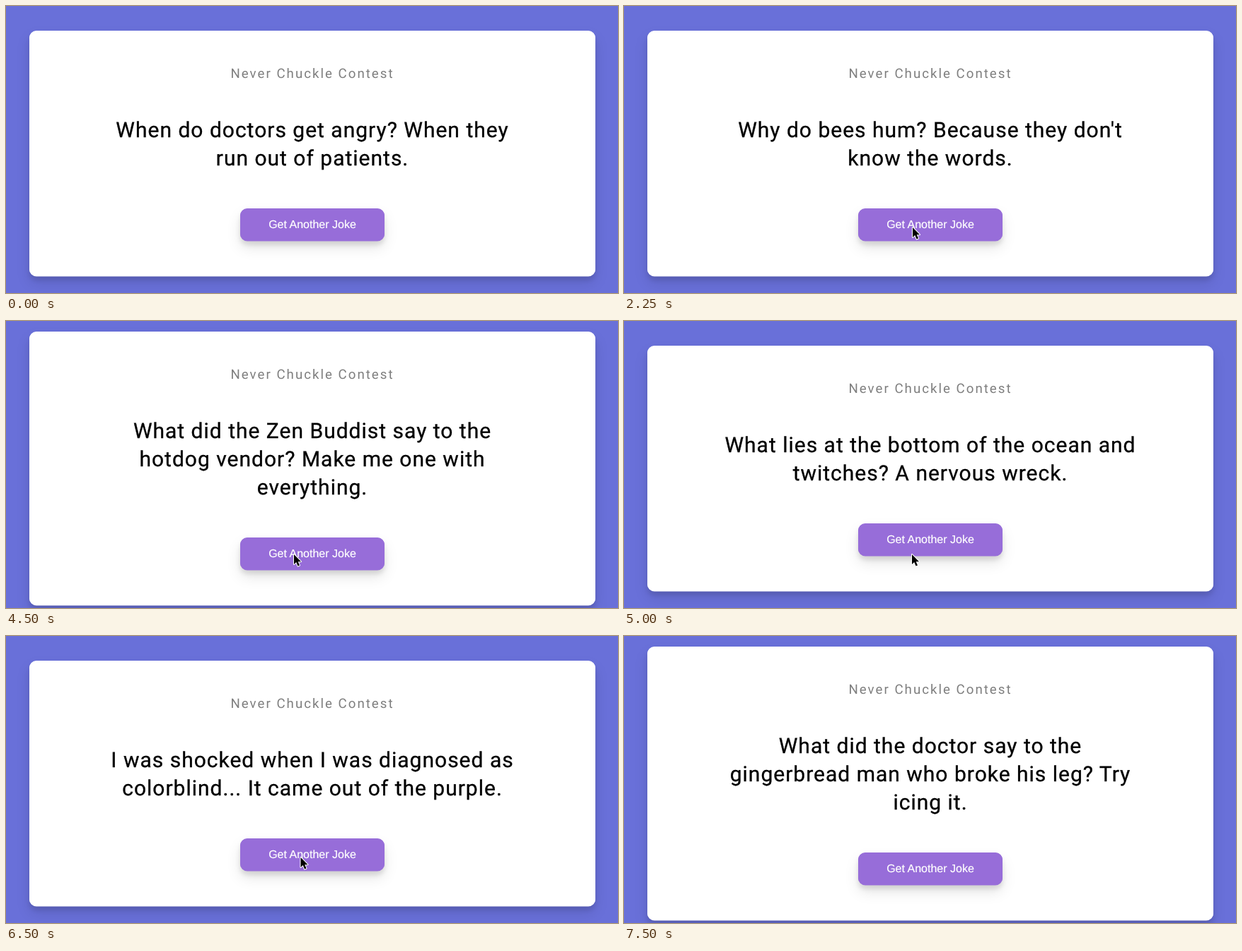
Animation of 865x407 px, one loop 8 s. Source, as an HTML page:

```html
<!DOCTYPE html>
<html lang="en">
<head>
<meta charset="utf-8">
<title>Joke card</title>
<style>
* { box-sizing: border-box; }
html, body { margin: 0; width: 100%; height: 100%; overflow: hidden; background: #6970d9; }
#stage {
  --shadow: 0 10px 20px rgba(0,0,0,.1), 0 6px 6px rgba(0,0,0,.1);
  position: relative; width: 865px; height: 407px; overflow: hidden;
  font-family: Roboto, sans-serif; text-rendering: geometricPrecision;
}
/* The solid half-pixel shadows soften the bottom edges. */
#card {
  position: absolute; left: 33px; width: 800px; padding: 50px 20px;
  background: #fff; border-radius: 10px; text-align: center;
  box-shadow: 0 .5px #fff, var(--shadow);
}
h3 { margin: 0; font-size: 18.72px; font-weight: 400; line-height: 22px; letter-spacing: 2px; opacity: .5; }
#joke {
  margin: 50px 0; font-size: 30px; line-height: 40px; letter-spacing: 1px;
  white-space: pre; color: #000; -webkit-text-stroke: .3px #000;
}
#button {
  width: 204px; height: 46px; margin: 0 auto; border-radius: 10px;
  background: #976dd9; color: #fff; font: 16px/47px "Liberation Sans", Arial, sans-serif;
  -webkit-text-stroke: .2px #fff;
  box-shadow: 0 .5px #976dd9, var(--shadow);
}
#cursor { position: absolute; left: 0; top: .5px; overflow: visible; }
</style>
</head>
<body>
<div id="stage">
  <div id="card">
    <h3>Never Chuckle Contest</h3>
    <div id="joke"></div>
    <div id="button">Get Another Joke</div>
  </div>
  <svg id="cursor" width="12" height="18">
    <path d="M0 0V14L3.2 11L5.6 16.6L8 15.6L5.7 10.2H10Z" stroke="#fff" stroke-width="2" stroke-linejoin="round" paint-order="stroke"/>
  </svg>
</div>
<script>
const LOOP = 8000, CARD_MIDDLE = 209;

// [start time, text]
const jokes = [
  [0, "When do doctors get angry? When they\nrun out of patients."],
  [2250, "Why do bees hum? Because they don't\nknow the words."],
  [3000, "What did the Zen Buddist say to the\nhotdog vendor? Make me one with\neverything."],
  [5000, "What lies at the bottom of the ocean and\ntwitches? A nervous wreck."],
  [6000, "I was shocked when I was diagnosed as\ncolorblind... It came out of the purple."],
  [7000, "What did the doctor say to the\ngingerbread man who broke his leg? Try\nicing it."]
];

// [start time, tip x, tip y]; no position means hidden
const moves = [
  [0], [1000, 439, 360], [1250, 417, 312], [1750, 408, 313], [4250, 399, 341],
  [4500, 407, 330], [5500, 411.5, 324.5], [6500, 416.5, 313], [7500]
];

const el = id => document.getElementById(id);
const card = el("card"), joke = el("joke"), button = el("button"), cursor = el("cursor");
const current = (steps, t) => steps.findLast(step => step[0] <= t);

function draw(now) {
  const t = now % LOOP;
  const text = current(jokes, t)[1];
  if (joke.textContent !== text) joke.textContent = text;
  const height = 268 + 40 * text.split("\n").length;
  card.style.top = CARD_MIDDLE - height / 2 + "px";

  const pressed = t >= 5750 && t < 6000;
  button.style.transform = pressed ? "scale(.98)" : "none";

  const [, x, y] = current(moves, t);
  cursor.style.display = x ? "block" : "none";
  if (x) cursor.style.transform = `translate(${x}px, ${y}px)`;
}

const start = performance.now();
function tick() {
  draw(performance.now() - start);
  requestAnimationFrame(tick);
}
tick();
</script>
</body>
</html>
```
